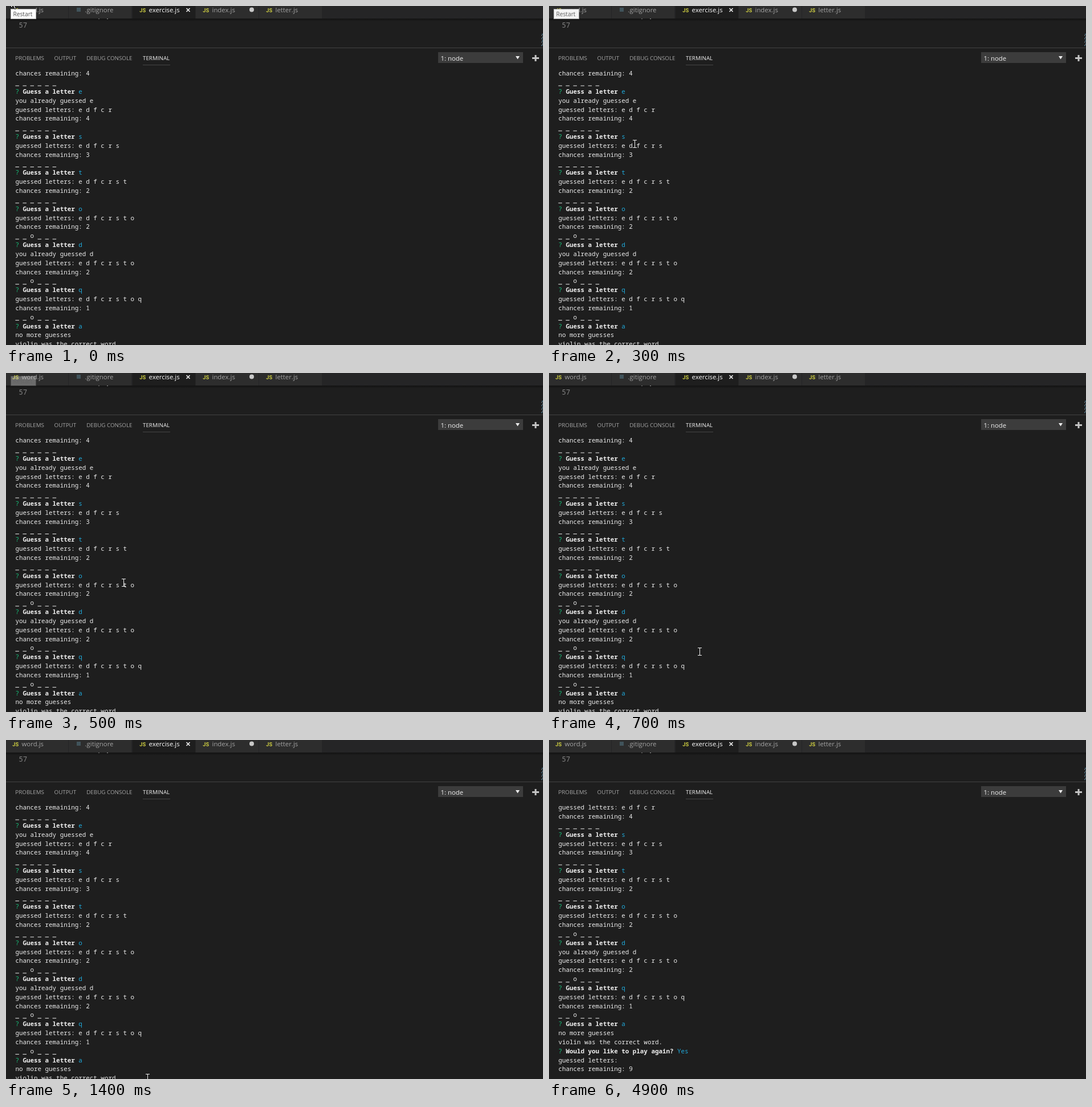
Recreate the animation shown at these times as an HTML page with a canvas. Size 942 px wide and 595 px high, loop 8 s.

```html
<!DOCTYPE html>
<html lang="en">
<head>
<meta charset="utf-8">
<title>Guessing game terminal</title>
<style>
  html, body { margin: 0; width: 100%; height: 100%; overflow: hidden; background: #1e1e1e; }
  canvas { display: block; }
</style>
</head>
<body>
<canvas id="stage" width="942" height="595"></canvas>
<script>
const ctx = document.getElementById('stage').getContext('2d');
const LOOP = 8000, SCROLL_AT = 4900, SCROLL_ROWS = 4;
const CELL = 6.52, ROW = 15.83, LEFT = 16.4, BASE = 122.3;
const UI = '"Open Sans", "Noto Sans", sans-serif';
const MONO = '"Noto Sans Mono", "DejaVu Sans Mono", monospace';

const BLANK = '_ _ _ _ _ _', FOUND = '_ _ o _ _ _';
const guessed = s => 'guessed letters: ' + [...s].join(' ');
const left = n => 'chances remaining: ' + n;
const ask = (q, a) => ({ q, a });
const letter = a => ask('Guess a letter', a);

const lines = [
  left(4), BLANK,
  letter('e'), 'you already guessed e', guessed('edfcr'), left(4), BLANK,
  letter('s'), guessed('edfcrs'), left(3), BLANK,
  letter('t'), guessed('edfcrst'), left(2), BLANK,
  letter('o'), guessed('edfcrsto'), left(2), FOUND,
  letter('d'), 'you already guessed d', guessed('edfcrsto'), left(2), FOUND,
  letter('q'), guessed('edfcrstoq'), left(1), FOUND,
  letter('a'), 'no more guesses', 'violin was the correct word.',
  ask('Would you like to play again?', 'Yes'), guessed(''), left(9), BLANK
];

// Pointer positions, each held until the next time: [ms, x, y]
const path = [
  [200, 95, 120], [300, 150, 242], [400, 171, 290], [500, 206, 368], [600, 244, 444],
  [700, 264, 489], [900, 277, 531], [1000, 275, 574], [1100, 267, 595],
  [1200, 256, 597], [1300, 245, 594], [1400, 248, 593], [1600, 262, 586]
];
const POINTER_GONE = 1700;

// Tooltip opacity for each 100 ms
const fade = [1, 1, 1, 0.88, 0.46, 0.2, 0.06];

function rect(x, y, w, h, color) {
  ctx.fillStyle = color;
  ctx.fillRect(x, y, w, h);
}

function text(s, x, y, font, color) {
  ctx.font = font;
  ctx.fillStyle = color;
  ctx.fillText(s, x, y);
}

function shape(points, color) {
  ctx.fillStyle = color;
  ctx.beginPath();
  points.forEach(([x, y]) => ctx.lineTo(x, y));
  ctx.closePath();
  ctx.fill();
}

function cells(s, col, y, color, weight = 500) {
  const font = weight + ' 10.87px ' + MONO;
  [...s].forEach((ch, i) => {
    const x = LEFT + (col + i) * CELL;
    if (ch === '_') rect(x, y + 1.4, CELL, 1, color);
    else if (ch !== ' ') text(ch, x, Math.round(y), font, color);
  });
}

function tabs() {
  rect(0, 0, 942, 22, '#252526');
  const names = ['word.js', '.gitignore', 'exercise.js', 'index.js', 'letter.js'];
  names.forEach((name, i) => {
    const x = Math.round(i * 111.3 - 1), active = i === 2;
    rect(x, 0, 110, active ? 23 : 22, active ? '#1e1e1e' : '#2d2d2d');
    text(name, x + 28.5, 11, '11.4px ' + UI, active ? '#ffffff' : '#a3a3a3');
    if (i === 1) rect(x + 14, 3, 7, 7, '#41535b');
    else text('JS', x + 12.3, 10.5, 'bold 9.3px Roboto, sans-serif', '#cbcb41');
  });
  ctx.strokeStyle = '#eeeeee';
  ctx.lineWidth = 1.7;
  ctx.beginPath();
  ctx.moveTo(316.5, 4); ctx.lineTo(322.5, 10);
  ctx.moveTo(322.5, 4); ctx.lineTo(316.5, 10);
  ctx.stroke();
  ctx.fillStyle = '#c8c8c8';
  ctx.beginPath();
  ctx.arc(431, 6.5, 4, 0, Math.PI * 2);
  ctx.fill();
}

function editor() {
  const shade = ctx.createLinearGradient(0, 22, 0, 27);
  shade.addColorStop(0, 'rgba(0,0,0,.4)');
  shade.addColorStop(1, 'rgba(0,0,0,0)');
  rect(0, 22, 942, 5, shade);
  rect(162, 22, 2, 1, '#777777');
  rect(177, 22, 2, 1, '#999999');
  text('57', 22.5, 38, '12.2px ' + MONO, '#858585');
  for (let y = 49; y < 71; y += 2) {
    rect(939 + y % 3, y, 2, 1, y % 4 === 1 ? '#5b9ab8' : '#7d8f98');
  }
}

function panel() {
  rect(0, 73, 942, 1, '#424242');
  [['PROBLEMS', 16.3], ['OUTPUT', 84.5], ['DEBUG CONSOLE', 141.2], ['TERMINAL', 240]]
    .forEach(([s, x], i) => text(s, x, 95, '9.8px ' + UI, i === 3 ? '#f0f0f0' : '#a6a6a6'));
  rect(240, 103, 48, 1, '#454545');
  rect(758, 81, 149, 19, '#3c3c3c');
  text('1: node', 762.5, 95.5, '11.4px ' + UI, '#f0f0f0');
  shape([[894, 88], [901, 88], [897.5, 93.5]], '#f0f0f0');
  rect(923, 90, 12, 3, '#c5c5c5');
  rect(927.5, 86, 3, 11, '#c5c5c5');
}

function terminal(t) {
  const first = t < SCROLL_AT ? 0 : SCROLL_ROWS;
  lines.slice(first, first + 31).forEach((line, i) => {
    const y = BASE + i * ROW;
    if (typeof line === 'string') return cells(line, 0, y, '#ececec');
    cells('?', 0, y, '#16c079');
    cells(line.q, 2, y, '#f0f0f0', 'bold');
    cells(line.a, line.q.length + 3, y, '#1faadb');
  });
}

function tooltip(t) {
  ctx.globalAlpha = fade[Math.floor(t / 100)] || 0;
  rect(8, 5, 45, 18, '#b0b0b0');
  rect(9, 6, 43, 16, '#ffffff');
  text('Restart', 12.5, 18, '10.2px ' + UI, '#4c4c4c');
  ctx.globalAlpha = 1;
}

function arrow(x, y) {
  const outline = [[0, 0], [0, 17], [4, 13], [7, 19], [9, 18], [6, 12], [11, 12]]
    .map(([dx, dy]) => [x + dx, y + dy]);
  shape(outline, '#ffffff');
  ctx.strokeStyle = '#000000';
  ctx.lineWidth = 1;
  ctx.stroke();
}

function beam(x, y) {
  const color = '#f0f0f0';
  rect(x, y - 7, 1, 14, color);
  rect(x - 3, y - 7, 7, 1, color);
  rect(x - 3, y + 6, 7, 1, color);
}

function pointer(t) {
  if (t >= POINTER_GONE) return;
  const spot = path.filter(p => p[0] <= t).pop();
  if (spot) beam(spot[1], spot[2]);
  else arrow(8.5, -13.5);
}

function draw(t) {
  rect(0, 0, 942, 595, '#1e1e1e');
  tabs();
  editor();
  panel();
  terminal(t);
  tooltip(t);
  pointer(t);
}

const start = performance.now();
function tick() {
  draw((performance.now() - start) % LOOP);
  requestAnimationFrame(tick);
}
tick();
</script>
</body>
</html>
```
